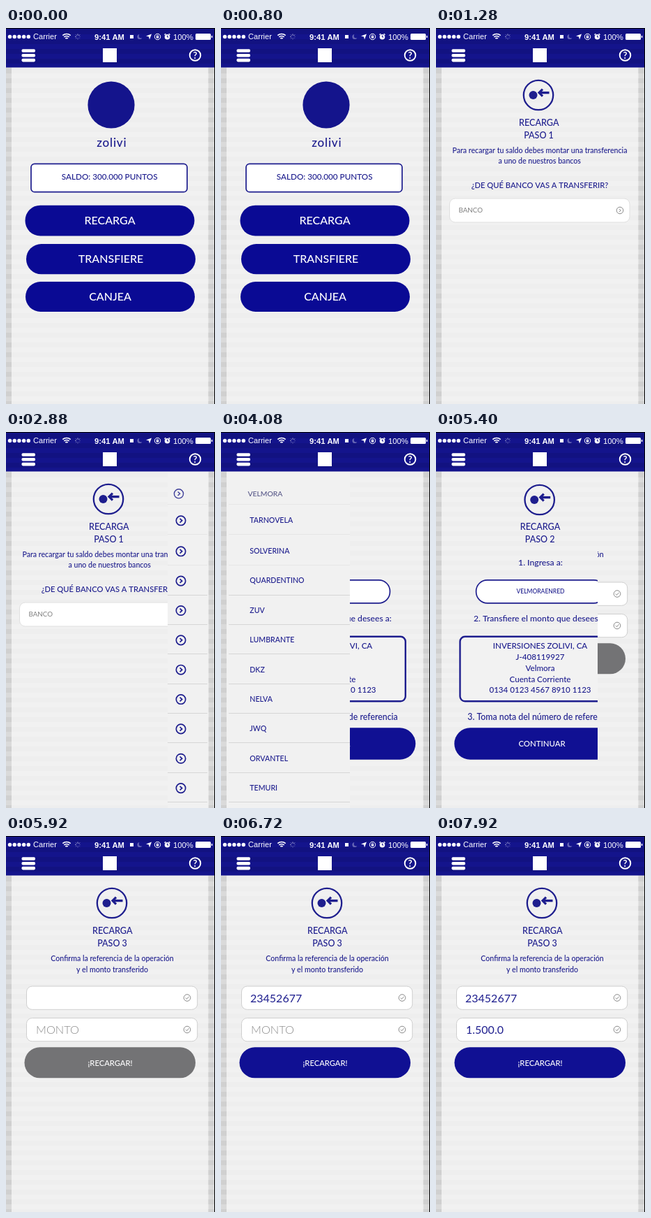
Write an HTML page with a canvas that moves like this. It is 300 px wide and 538 px high and loops after 8000 ms.

```html
<!DOCTYPE html>
<html lang="es">
<head>
<meta charset="utf-8">
<title>Recarga de saldo</title>
<style>
html, body { margin: 0; width: 100%; height: 100%; overflow: hidden; background: #f0f0f0; }
canvas { display: block; width: 300px; height: 538px; }
</style>
</head>
<body>
<canvas id="stage"></canvas>
<script>
const W = 300, H = 538, LOOP = 8000, TICK = 40;
const NAVY = '#0a0a94', DEEP = '#101093', BAR = '#14148c', INK = '#1e1e8e';
const GRAY = '#8a8a8a', PALE = '#d6d6d6', FAINT = '#e6e6e6';
const canvas = document.getElementById('stage');
const c = canvas.getContext('2d');
const dpr = window.devicePixelRatio || 1;
canvas.width = W * dpr;
canvas.height = H * dpr;

// ---- drawing helpers ----
function text(str, x, y, size, { color = INK, align = 'center', weight = 500, font = 'Lato, "Open Sans"', gap = 0 } = {}) {
  c.font = `${weight} ${size}px ${font}, sans-serif`;
  c.letterSpacing = gap + 'px';
  c.textAlign = align;
  c.fillStyle = color;
  c.fillText(str, x, y + size * 0.36);
}

function box(x1, y1, x2, y2, r, fill, stroke, lw = 1) {
  c.beginPath();
  c.roundRect(x1, y1, x2 - x1, y2 - y1, r);
  if (fill) { c.fillStyle = fill; c.fill(); }
  if (stroke) { c.strokeStyle = stroke; c.lineWidth = lw; c.stroke(); }
}

function dot(x, y, r, color) {
  c.fillStyle = color;
  c.beginPath();
  c.arc(x, y, r, 0, 7);
  c.fill();
}

function ring(x, y, r, color, lw) {
  c.strokeStyle = color;
  c.lineWidth = lw;
  c.beginPath();
  c.arc(x, y, r, 0, 7);
  c.stroke();
}

function line(points, color, lw) {
  c.strokeStyle = color;
  c.lineWidth = lw;
  c.beginPath();
  points.forEach(([x, y]) => c.lineTo(x, y));
  c.stroke();
}

function chevron(x, y, r, color, lw) {
  const k = r * 0.42;
  ring(x, y, r, color, lw);
  line([[x - k * 0.5, y - k], [x + k * 0.6, y], [x - k * 0.5, y + k]], color, lw);
}

function check(x, y) {
  ring(x, y, 4.8, GRAY, 1);
  line([[x - 2.3, y], [x - 0.5, y + 1.8], [x + 2.5, y - 1.8]], GRAY, 1);
}

// Shrinks a control by a tenth and back between two times.
function press(t, start, end, x, y, draw) {
  const u = Math.min(1, Math.max(0, (t - start) / (end - start)));
  const s = 1 - 0.1 * Math.sin(Math.PI * u) ** 2;
  c.save();
  c.translate(x, y);
  c.scale(s, s);
  c.translate(-x, -y);
  draw();
  c.restore();
}

// ---- shared parts ----
function backdrop() {
  const strip = (x, w, light, dark) => {
    c.fillStyle = light;
    c.fillRect(x, 56, w, H);
    c.fillStyle = dark;
    for (let y = 58; y < H; y += 14) c.fillRect(x, y, w, 7);
  };
  strip(0, W, '#f1f1f1', '#eeeeee');
  strip(0, 8, '#dadada', '#d0d0d0');
  strip(290.5, 9, '#dadada', '#d0d0d0');
}

function statusBar() {
  const sys = { color: '#fff', align: 'left', weight: 400, font: '"Liberation Sans"' };
  for (let i = 0; i < 5; i++) dot(5.5 + i * 6.7, 12.5, 2.7, '#fff');
  text('Carrier', 39, 12.5, 11.1, sys);
  text('9:41 AM', 127, 12.5, 11.2, { ...sys, weight: 700 });
  text('100%', 240, 12.5, 11.3, sys);

  for (const r of [2.5, 5.5, 8.5]) {
    c.strokeStyle = '#fff';
    c.lineWidth = 1.7;
    c.beginPath();
    c.arc(87, 17, r, -2.3, -0.84);
    c.stroke();
  }
  for (let i = 0; i < 8; i++) {
    const a = i * Math.PI / 4, x = Math.cos(a), y = Math.sin(a);
    line([[103 + 2 * x, 12.5 + 2 * y], [103 + 4 * x, 12.5 + 4 * y]], `rgba(255,255,255,${0.2 + i * 0.08})`, 1);
  }
  c.fillStyle = '#fff';
  c.fillRect(178, 10, 5, 5);
  dot(192, 12.5, 3.6, '#6565b4');
  dot(194, 11.3, 3.2, BAR);
  c.fillStyle = '#fff';
  c.beginPath();
  [[209, 8.5], [206, 16.5], [205, 12.5], [201, 11.5]].forEach(([x, y]) => c.lineTo(x, y));
  c.fill();
  ring(217.5, 12.5, 4.2, '#fff', 1);
  c.fillStyle = '#fff';
  c.fillRect(215.8, 11.6, 3.4, 3);
  ring(217.5, 11.4, 1.2, '#fff', 0.8);
  dot(231.5, 12.8, 3.8, '#fff');
  line([[227.5, 9.8], [229.3, 8.3]], '#fff', 1.4);
  line([[235.5, 9.8], [233.7, 8.3]], '#fff', 1.4);
  line([[231.5, 10.5], [231.5, 13], [233.3, 13]], BAR, 1);
  box(272, 8, 294, 17, 1.5, '#fff');
  c.fillRect(294.8, 11, 1.5, 3);
}

function header() {
  c.fillStyle = BAR;
  c.fillRect(0, 0, W, 56.5);
  c.fillStyle = 'rgba(0,0,0,.08)';
  for (let y = 2; y < 56; y += 14) c.fillRect(0, y, W, 7);
  statusBar();
  for (const y of [30.2, 37, 43.8]) box(22.5, y, 42, y + 4.6, 1.8, '#fff');
  c.fillStyle = '#fff';
  c.fillRect(139, 29, 20, 20);
  ring(271.5, 39, 7.8, '#fff', 1.9);
  text('?', 271.5, 39, 13, { color: '#fff', weight: 700 });
  c.fillStyle = '#000';
  c.fillRect(0, 0, W, 1);
  c.fillRect(299, 0, 1, H);
}

function stepHead(x, y, step) {
  ring(x, y, 21.2, INK, 2.3);
  dot(x - 7.5, y, 6, INK);
  line([[x + 15.5, y - 3.4], [x + 1, y - 3.4]], INK, 3.4);
  line([[x + 6, y - 8.4], [x + 1, y - 3.4], [x + 6, y + 1.6]], INK, 3.2);
  text('RECARGA', x + 0.8, 135.5, 12.6);
  text('PASO ' + step, x + 0.5, 153.7, 12.5);
}

// ---- screens ----
function home(t) {
  const pill = (label, x1, y1, x2, y2) => {
    box(x1, y1, x2, y2, 21.7, NAVY);
    text(label, (x1 + x2) / 2, (y1 + y2) / 2 - 0.5, 16, { color: '#fff' });
  };
  dot(151, 110, 33.6, BAR);
  text('zolivi', 151.8, 164, 17, { gap: 0.8 });
  box(36, 194.3, 260, 234.7, 5, '#fff', INK, 1.7);
  text('SALDO: 300.000 PUNTOS', 148.7, 213, 11.7);
  press(t, 440, 800, 149, 275.5, () => pill('RECARGA', 27.5, 253.7, 270.5, 297.5));
  pill('TRANSFIERE', 29, 309, 272, 352.3);
  pill('CANJEA', 28, 363, 271, 406);
}

function bankStep(t) {
  stepHead(147, 96, 1);
  text('Para recargar tu saldo debes montar una transferencia', 149, 174.7, 10.6);
  text('a uno de nuestros bancos', 148.7, 190, 10.6);
  text('¿DE QUÉ BANCO VAS A TRANSFERIR?', 149, 225, 11.2);
  press(t, 2320, 2680, 148.5, 261, () => {
    box(19.5, 244, 278, 278, 8, '#fff', '#e0e0e0');
    text('BANCO', 32.5, 260.8, 9.8, { color: '#808080', align: 'left', weight: 400 });
    chevron(264, 261, 4.8, GRAY, 1);
  });
}

const banks = ['TARNOVELA', 'SOLVERINA', 'QUARDENTINO', 'ZUV', 'LUMBRANTE', 'DKZ', 'NELVA', 'JWQ', 'ORVANTEL', 'TEMURI'];

function bankList(t) {
  c.fillStyle = '#f1f1f1';
  c.fillRect(8, 56, 282.5, H);
  const rule = (y, color) => line([[11, y], [289, y]], color, 1);
  press(t, 3600, 3840, 147.5, 150, () => {
    text('VELMORA', 38.5, 88, 10.4, { color: '#4c4c80', align: 'left', weight: 400 });
    chevron(248, 88.3, 6.6, '#40409a', 1.4);
  });
  rule(103.5, FAINT);
  banks.forEach((name, i) => {
    const y = i ? 170.3 + (i - 1) * 42.35 : 126.3;
    text(name, 41.3, y, 10.6, { align: 'left' });
    chevron(251, y + 0.5, 6.7, INK, 1.7);
    rule(Math.round(y + 20) + 0.5, i > 1 ? PALE : FAINT);
  });
}

function transferStep(t) {
  stepHead(148.7, 97, 2);
  text('1. Ingresa a:', 150, 187, 12.2);
  box(57.6, 211.8, 242.5, 244.8, 16, '#fff', INK, 1.7);
  text('VELMORAENRED', 150, 228.3, 8.5);
  text('2. Transfiere el monto que desees a:', 149.5, 266.3, 12.15);
  box(34.5, 292.8, 264.8, 385.3, 7, '#f2f2f2', INK, 2.4);
  ['INVERSIONES ZOLIVI, CA', 'J-408119927', 'Velmora', 'Cuenta Corriente', '0134 0123 4567 8910 1123']
    .forEach((row, i) => text(row, 149.5, 305.7 + i * 15.9, 11.6));
  text('3. Toma nota del número de referencia', 149.5, 407.7, 12.35);
  press(t, 4520, 4960, 152.7, 446, () => {
    box(26.3, 423.3, 279.3, 468.8, 22.7, DEEP);
    text('CONTINUAR', 152, 446, 11.4, { color: '#fff' });
  });
}

function typed(t, start, hint, value, x, y) {
  const style = { align: 'left', weight: 400 };
  if (t < start) text(hint, x, y, 16.4, { ...style, color: GRAY, weight: 300 });
  else text(value.slice(0, Math.floor((t - start) / 100)), x, y, 16, style);
}

function confirmStep(t) {
  stepHead(152, 96, 3);
  text('Confirma la referencia de la operación', 152.5, 175.5, 10.6);
  text('y el monto transferido', 152.5, 191, 10.6);
  for (const y of [215, 260.5]) {
    box(29.5, y, 274.7, y + 33.3, 8, '#fff', '#cfcfcf');
    check(260, y + 16.5);
  }
  typed(t, 5920, 'REFERENCIA', '23452677', 42, 231.8);
  typed(t, 7200, 'MONTO', '1.500.0', 43, 277.5);
  box(26.5, 302.3, 272, 346.3, 22, t < 6720 ? '#737375' : DEEP);
  text('¡RECARGAR!', 149.5, 324.5, 11.2, { color: '#fff' });
}

const scenes = [[-1000, home], [1040, bankStep], [2840, bankList], [4000, transferStep], [5360, confirmStep]];

// Each screen is uncovered from right to left over the one before it.
function render(t) {
  c.setTransform(dpr, 0, 0, dpr, 0, 0);
  for (const [start, draw] of scenes) {
    const edge = 279 - 47 * (t - start) / TICK;
    if (t < start) break;
    c.save();
    c.beginPath();
    c.rect(Math.max(0, edge), 56, W, H);
    c.clip();
    backdrop();
    draw(t);
    c.restore();
  }
  header();
}

const origin = performance.now();
function loop() {
  const t = (performance.now() - origin) % LOOP;
  render(Math.floor(t / TICK) * TICK);
  requestAnimationFrame(loop);
}
loop();
</script>
</body>
</html>
```
